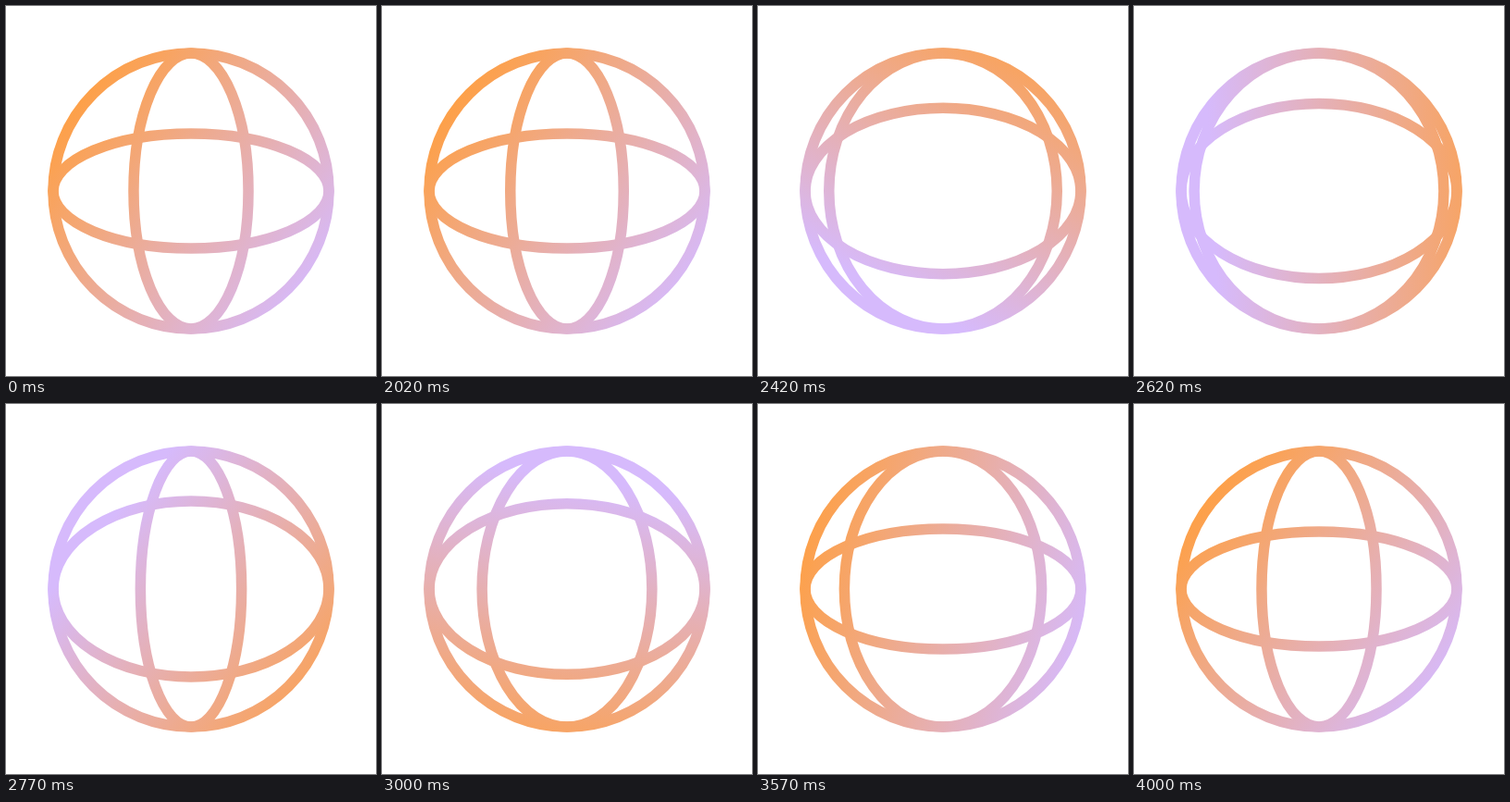
Write an HTML page with a canvas that moves like this. It is 400x400 px and loops after 4020 ms.

```html
<!DOCTYPE html>
<html>
<head>
<meta charset="utf-8">
<title>Spinning globe</title>
<style>
html, body { margin: 0; height: 100%; overflow: hidden; background: #fff; }
canvas { display: block; }
</style>
</head>
<body>
<canvas id="stage" width="400" height="400"></canvas>
<script>
const ctx = document.getElementById('stage').getContext('2d');
const LOOP = 4020, REST = 2000, SPIN = 2000;
const C = 200, R = 149;
const RAD = Math.PI / 180;

// Easing curve with control points (x1, 0) and (x2, 1).
function ease(x, x1, x2) {
  let lo = 0, hi = 1;
  for (let i = 0; i < 24; i++) {
    const u = (lo + hi) / 2, v = 1 - u;
    if (3 * x1 * u * v * v + 3 * x2 * u * u * v + u * u * u < x) lo = u;
    else hi = u;
  }
  return lo * lo * (3 - 2 * lo);
}

function ring(rx, ry) {
  ctx.beginPath();
  ctx.ellipse(C, C, rx, ry, 0, 0, 2 * Math.PI);
  ctx.stroke();
}

// The tilt rises to its peak, then settles back.
function tiltAt(x) {
  const peak = 0.365;
  return x < peak
    ? ease(x / peak, 0.54, 0.2)
    : 1 - ease((x - peak) / (1 - peak), 0.54, 0.2);
}

function draw(time) {
  const x = Math.min(1, Math.max(0, (time - REST) / SPIN));
  const turn = 360 * ease(x, 0.2, 0.48);
  const tilt = tiltAt(x);

  const dir = (37 + turn) * RAD;
  const dx = Math.cos(dir), dy = Math.sin(dir);
  const from = -170 - 55 * tilt, to = 170 - 55 * tilt;
  const paint = ctx.createLinearGradient(
    C + from * dx, C + from * dy, C + to * dx, C + to * dy);
  paint.addColorStop(0, '#ff9f40');
  paint.addColorStop(1, '#d6bafc');

  ctx.clearRect(0, 0, 400, 400);
  ctx.strokeStyle = paint;
  ctx.lineWidth = 11.5;
  ring(R, R);
  ring(R, 62 + 33 * tilt);
  ring(R * Math.abs(Math.sin((24.6 - turn) * RAD)), R);
}

const start = performance.now();
function tick() {
  draw((performance.now() - start) % LOOP);
  requestAnimationFrame(tick);
}
tick();
</script>
</body>
</html>
```
